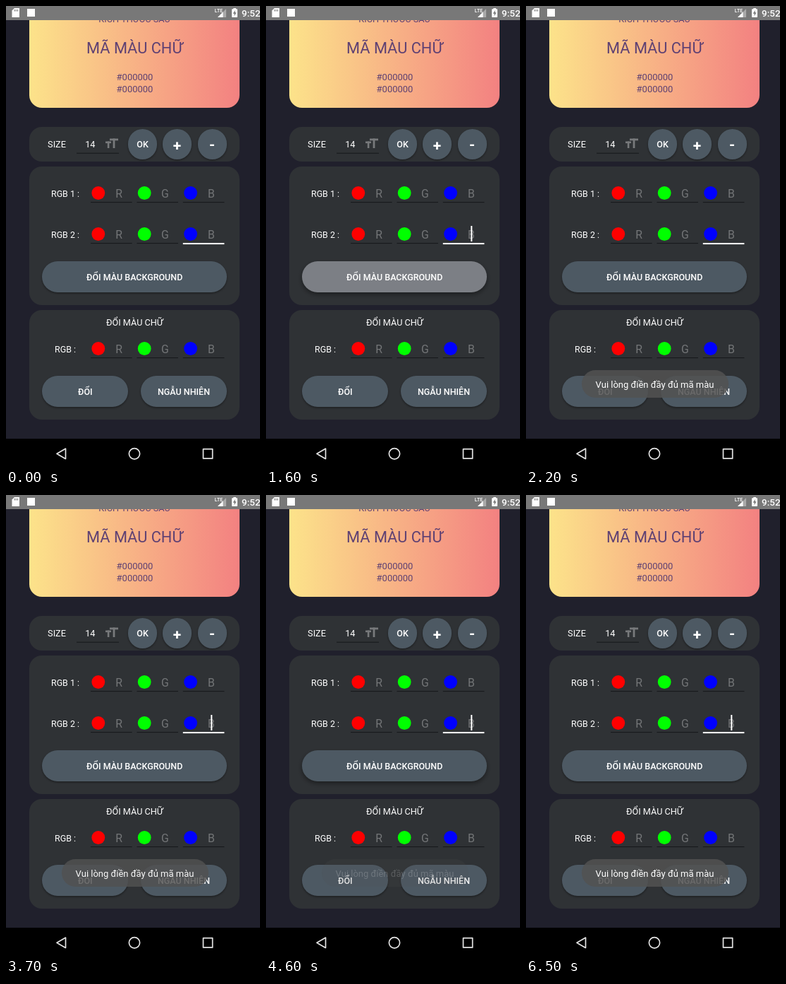
An HTML page with a canvas for the animation above (6600 ms loop, 360 by 652 pixels).

```html
<!DOCTYPE html>
<html lang="vi">
<head>
<meta charset="utf-8">
<title>Color form</title>
<style>
html, body { margin: 0; width: 100%; height: 100%; overflow: hidden; background: #20202c; }
canvas { display: block; width: 360px; height: 652px; }
</style>
</head>
<body>
<canvas id="stage"></canvas>
<script>
const W = 360, H = 652, LOOP = 6600, STEP = 100;
const canvas = document.getElementById('stage');
const ctx = canvas.getContext('2d');
const dpr = window.devicePixelRatio || 1;
canvas.width = W * dpr;
canvas.height = H * dpr;

const BLINKS = [400, 900, 1400, 1900, 2400, 2900, 3400, 3900, 4500, 5000, 5500, 6000, 6500];
const TAPS = [1600, 4500];
const FADE = 500, HIDE_AT = 3600;
const BUTTON = '#4d5963', PANEL = '#2f3235', HINT = '#737577', INK = '#5f4173';

function rect(x, y, w, h, color) {
  ctx.fillStyle = color;
  ctx.fillRect(x, y, w, h);
}

function round(x, y, w, h, r, color) {
  ctx.fillStyle = color;
  ctx.beginPath();
  ctx.roundRect(x, y, w, h, r);
  ctx.fill();
}

function disc(x, y, r, color) {
  ctx.fillStyle = color;
  ctx.beginPath();
  ctx.arc(x, y, r, 0, Math.PI * 2);
  ctx.fill();
}

function poly(color, ...points) {
  ctx.fillStyle = color;
  ctx.beginPath();
  points.forEach(([x, y]) => ctx.lineTo(x, y));
  ctx.closePath();
  ctx.fill();
}

function text(str, x, y, size, color = '#fff', weight = 400) {
  ctx.font = `${weight} ${size}px Roboto, sans-serif`;
  ctx.textAlign = 'center';
  ctx.fillStyle = color;
  ctx.fillText(str, x, y);
}

function button(x, y, w, h, color = BUTTON, lift = 0) {
  ctx.save();
  ctx.shadowColor = 'rgba(0,0,0,0.4)';
  ctx.shadowBlur = (3 + 3 * lift) * dpr;
  ctx.shadowOffsetY = (1.4 + 1.6 * lift) * dpr;
  round(x, y, w, h, Math.min(w, h) / 2, color);
  ctx.restore();
}

function statusBar() {
  rect(0, 0, W, 20, '#787878');
  poly('#fff', [12, 3], [19, 3], [19, 16], [8.5, 16], [8.5, 6.5]);
  for (let i = 0; i < 3; i++) rect(11.6 + i * 2.2, 4.8, 1.1, 2.8, '#787878');
  rect(30, 4, 11, 11, '#fff');
  poly('#a9a9a9', [300, 16], [312, 16], [312, 4]);
  poly('#fff', [300, 16], [307.5, 16], [307.5, 8.5]);
  text('LTE', 301.5, 8.5, 7, '#fff', 500);
  rect(322.3, 3, 3.6, 2, '#fff');
  round(320, 4.3, 8, 11.8, 0.8, '#fff');
  poly('#787878', [324.7, 6], [321.7, 10.8], [323.6, 10.8], [323.6, 14.3], [326.5, 9.3], [324.7, 9.3]);
  text('9:52', 347.3, 14.6, 13.4, '#fff', 500);
}

function previewCard() {
  const g = ctx.createLinearGradient(33, 0, 331, 0);
  g.addColorStop(0, '#fce38a');
  g.addColorStop(1, '#f38181');
  round(33, 0, 298, 144, 18, g);
  text('KÍCH THƯỚC SAU', 182, 22.5, 12.7, INK);
  text('MÃ MÀU CHỮ', 182.3, 67, 21.8, INK);
  text('#000000', 182.5, 104.5, 13, INK);
  text('#000000', 182.5, 122, 13, INK);
}

function sizePanel() {
  round(33, 171, 298, 49, 18, PANEL);
  text('SIZE', 72, 200, 12.7);
  text('14', 119.3, 200, 12.7);
  rect(100, 207.7, 60, 1, '#15171a');
  const gray = '#77797b';
  rect(141, 191.5, 8, 2.6, gray);
  rect(143.8, 191.5, 2.6, 9.5, gray);
  rect(147, 187.5, 12, 2.8, gray);
  rect(151.6, 187.5, 2.8, 13.5, gray);
  [173, 222, 272].forEach(x => button(x, 174, 41, 43));
  text('OK', 193.5, 200, 12.5, '#fff', 500);
  text('+', 242.5, 203.5, 21, '#fff', 700);
  text('-', 292.2, 202.5, 21, '#fff', 700);
}

function rgbRow(label, y, focused) {
  text(label, 84, y + 5, 12.4);
  ['R', 'G', 'B'].forEach((hint, i) => {
    const x = 120 + i * 65.4;
    disc(x + 10.8, y, 9.4, ['#f00', '#0f0', '#00f'][i]);
    text(hint, x + 40, y + 6.3, 15.8, HINT);
    const active = focused && i === 2;
    rect(x, y + 12.6, 58.6, active ? 2 : 1, active ? '#fff' : '#15171a');
  });
}

function backgroundPanel(press, lift) {
  round(33, 227, 298, 196, 18, PANEL);
  rgbRow('RGB 1 :', 264.5);
  rgbRow('RGB 2 :', 322.5, true);
  button(51, 361, 262, 44, press ? '#7c7f85' : BUTTON, lift);
  text('ĐỔI MÀU BACKGROUND', 182.2, 387.7, 12.5, '#fff', 500);
}

function textPanel() {
  round(33, 430, 298, 155, 18, PANEL);
  text('ĐỔI MÀU CHỮ', 182.3, 452, 12.7);
  rgbRow('RGB :', 484.5);
  button(51, 523, 122, 44);
  button(191, 523, 122, 44);
  text('ĐỔI', 112.3, 549.7, 12.5, '#fff', 500);
  text('NGẪU NHIÊN', 252, 549.7, 12.5, '#fff', 500);
}

function navBar() {
  rect(0, 612, W, 40, '#000');
  ctx.strokeStyle = '#e4e4e4';
  ctx.lineWidth = 1.7;
  ctx.lineJoin = 'round';
  ctx.beginPath();
  ctx.moveTo(84.5, 626);
  ctx.lineTo(72, 633.2);
  ctx.lineTo(84.5, 640.4);
  ctx.closePath();
  ctx.stroke();
  ctx.beginPath();
  ctx.arc(182, 633.2, 7.6, 0, Math.PI * 2);
  ctx.stroke();
  ctx.strokeRect(279.5, 626.7, 13.2, 13.2);
}

function toast(alpha) {
  if (alpha <= 0) return;
  ctx.globalAlpha = alpha * 0.86;
  round(79, 515, 208, 39, 19.5, '#525252');
  ctx.globalAlpha = alpha;
  text('Vui lòng điền đầy đủ mã màu', 182.5, 539.7, 13);
  ctx.globalAlpha = 1;
}

// Decelerating fade in after a tap, accelerating fade out.
function toastAlpha(t) {
  const tap = t >= TAPS[1] ? TAPS[1] : TAPS[0];
  const k = Math.min(1, Math.max(0, (t - tap - 50) / FADE));
  const shown = t >= tap + STEP * 6 ? 1 : 1 - (1 - k) ** 2;
  if (tap === TAPS[1] || t < HIDE_AT) return shown;
  return 1 - Math.min(1, (t - HIDE_AT) / FADE) ** 2;
}

function draw(t) {
  const since = t - (t >= TAPS[1] ? TAPS[1] : TAPS[0]);
  const press = since >= 0 && since < STEP;
  const lift = since < 0 ? 0 : Math.max(0, Math.min(1, (300 - since) / 200));
  ctx.setTransform(dpr, 0, 0, dpr, 0, 0);
  rect(0, 0, W, H, '#20202c');
  previewCard();
  sizePanel();
  backgroundPanel(press, lift);
  textPanel();
  if (BLINKS.filter(b => b <= t).length % 2) rect(290.3, 311, 2, 22, '#fff');
  toast(toastAlpha(t));
  statusBar();
  navBar();
}

const start = performance.now();
function tick() {
  const t = (performance.now() - start) % LOOP;
  draw(Math.floor(t / STEP) * STEP);
  requestAnimationFrame(tick);
}
tick();
</script>
</body>
</html>
```
